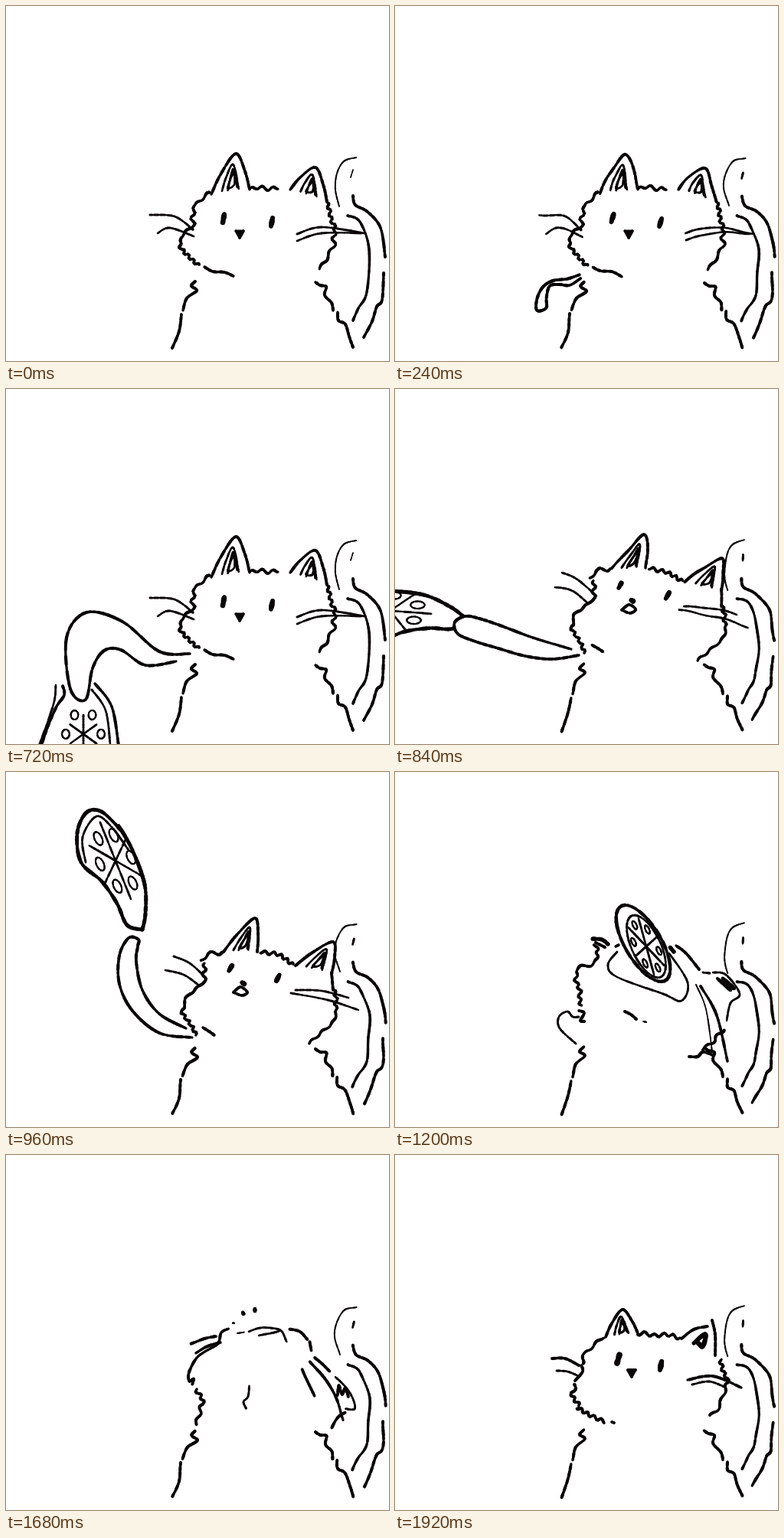
Write an HTML page with a canvas that moves like this. It is 500x464 px and loops after 1.98 s.

```html
<!DOCTYPE html>
<html lang="en">
<head>
<meta charset="utf-8">
<title>Hungry cat</title>
<style>
html, body { margin: 0; width: 100%; height: 100%; overflow: hidden; background: #fff; }
canvas { display: block; }
</style>
</head>
<body>
<canvas id="stage" width="500" height="464"></canvas>
<script>
const ctx = document.getElementById('stage').getContext('2d');
const INK = '#0a0506', STEP = 60, COUNT = 33;
let phase = 0; // which redrawing of the same line is shown

const spline = (a, b, c, d, t) =>
  b + t / 2 * (c - a + t * (2 * a - 5 * b + 4 * c - d + t * (3 * (b - c) + d - a)));

// Smooth curve through flat x, y pairs, with an optional furry ripple.
function curve(p, ripple = 0) {
  const n = p.length / 2, out = [], steps = ripple ? 14 : 8;
  const at = (k, axis) => p[Math.max(0, Math.min(n - 1, k)) * 2 + axis];
  for (let k = 0; k < (n - 1) * steps + 1; k++) {
    const j = Math.min(n - 2, Math.floor(k / steps)), t = k / steps - j;
    let [x, y] = [0, 1].map(a => spline(at(j - 1, a), at(j, a), at(j + 1, a), at(j + 2, a), t));
    if (ripple) {
      const r = ripple * (Math.sin(x * 0.47 + y * 0.52) + 0.6 * Math.sin(x * 0.21 - y * 0.27));
      const dx = at(j + 1, 0) - at(j, 0), dy = at(j + 1, 1) - at(j, 1), d = Math.hypot(dx, dy);
      x -= r * dy / d;
      y += r * dx / d;
    }
    if (phase) {
      x += Math.sin(y * 0.11 + phase * 4);
      y += Math.sin(x * 0.12 + phase * 3);
    }
    out.push([x, y]);
  }
  return out;
}

function ink(points, width) {
  points.forEach(([x, y], k) => {
    if (!k) return;
    ctx.lineWidth = width * (0.96 + 0.13 * Math.sin(x * 0.7 + y * 0.9));
    ctx.beginPath();
    ctx.moveTo(...points[k - 1]);
    ctx.lineTo(x, y);
    ctx.stroke();
  });
}

function fill(points, color) {
  ctx.fillStyle = color;
  ctx.beginPath();
  points.forEach(p => ctx.lineTo(...p));
  ctx.fill();
}

const pen = (width, ...p) => ink(curve(p), width);
const line = (...p) => pen(3.8, ...p);
const thin = (...p) => pen(2.8, ...p);
const fur = (...p) => ink(curve(p, 2.1), 3.8);

// Two bowed sides with a scribble between them.
function ear(ax, ay, tx, ty, bx, by) {
  const at = (u, v) => [
    (ax + (bx - ax) * u) * (1 - v) + tx * v,
    (ay + (by - ay) * u) * (1 - v) + ty * v
  ];
  line(ax, ay, ...at(-0.15, 0.5), tx, ty, ...at(1.12, 0.5), bx, by);
  thin(...at(0.26, 0.05), ...at(0.22, 0.4), ...at(0.4, 0.72), ...at(0.72, 0.06));
  thin(...at(0.42, 0.05), ...at(0.45, 0.6), ...at(0.6, 0.2), ...at(0.4, 0.12), ...at(0.55, 0.5), ...at(0.68, 0.1));
}

function nose(x, y) {
  const p = [[x - 5, y - 4], [x + 5, y - 4], [x, y + 5], [x - 5, y - 4]];
  fill(p, INK);
  ink(p, 3.5);
}

function body() {
  line(247, 360, 242, 366, 249, 372, 236, 382, 231, 398);
  line(229, 403, 226, 425, 217, 447);
  line(404, 361, 410, 365, 418, 367, 416, 378, 425, 388, 427, 398);
  line(433, 400, 434, 411, 443, 416, 448, 432, 453, 446);
}

function tail() {
  pen(2, 457, 198, 441, 203, 432, 219, 430, 240, 435, 262);
  phase ? thin(454, 217, 453, 225) : pen(1.5, 453, 214, 450, 224);
  line(453, 248, 456, 260, 472, 269, 489, 290, 495, 328);
  line(493, 349, 491, 384, 484, 393, 478, 412, 467, 433);
  pen(3.4, 446, 274, 462, 282, 474, 318, 471, 374, 460, 395, 453, 411);
}

function front() {
  fur(267, 246, 247, 258, 244, 292);
  ear(268, 246, 300, 193, 318, 240);
  fur(318, 239, 336, 238, 355, 238);
  ear(371, 240, 404, 211, 419, 256);
  fur(418, 258, 428, 288, 426, 318, 407, 342);
  fur(243, 291, 229, 305, 231, 320, 250, 340);
  line(259, 341, 270, 347, 285, 348, 297, 353);
  thin(188, 273, 220, 275, 244, 292);
  thin(198, 297, 214, 290, 245, 301);
  thin(380, 298, 412, 289, 468, 297);
  thin(380, 307, 412, 297, 468, 297);
  pen(6.5, 285, 272, 283, 283);
  pen(6.5, 348, 277, 346, 288);
  nose(305, 298);
}

function lookUp() {
  ear(284, 235, 325, 191, 328, 235);
  fur(255, 247, 266, 239, 282, 235);
  fur(333, 234, 355, 239, 374, 253);
  ear(378, 253, 427, 222, 425, 264);
  line(425, 262, 427, 285);
  fur(258, 250, 258, 276, 240, 293, 231, 312, 248, 344);
  line(257, 334, 265, 339, 272, 344);
  fur(428, 285, 431, 315, 415, 338, 397, 356);
  thin(219, 241, 240, 250, 262, 270);
  thin(208, 259, 232, 265, 252, 279);
  thin(372, 289, 420, 298, 460, 311);
  thin(378, 285, 412, 286, 447, 295);
  pen(6, 295, 253, 291, 260);
  pen(6, 357, 265, 353, 273);
  pen(6, 308, 275, 311, 277);
  pen(3.5, 297, 288, 306, 281, 315, 288, 308, 292, 297, 288);
}

function gape() {
  pen(5, 258, 218, 270, 219, 278, 225);
  line(262, 223, 274, 229);
  line(288, 228, 292, 226);
  fur(262, 226, 262, 246, 238, 260, 240, 285, 244, 305);
  line(240, 312, 247, 315, 242, 325, 247, 326);
  thin(240, 320, 232, 320, 225, 313, 214, 320, 215, 335, 236, 355);
  thin(290, 235, 278, 252, 290, 268, 350, 290, 374, 299, 382, 275, 358, 237);
  line(367, 227, 380, 237, 397, 258);
  pen(5, 359, 229, 364, 235);
  thin(402, 262, 411, 263);
  thin(415, 262, 432, 265, 450, 290, 438, 302, 433, 325);
  pen(4.5, 421, 270, 438, 285, 428, 270, 443, 283, 426, 275);
  pen(2, 393, 278, 406, 310, 414, 365);
  line(399, 280, 420, 318, 434, 378);
  fur(427, 336, 418, 352, 402, 364);
  line(384, 372, 395, 372, 402, 366, 415, 370);
  line(300, 313, 308, 317, 315, 323);
  pen(2, 324, 326, 328, 327);
}

function swallow() {
  pen(4.5, 308, 205, 309, 207);
  pen(4.5, 324, 202, 324, 205);
  pen(2.5, 296, 219, 298, 219);
  pen(2, 303, 232, 312, 231);
  thin(318, 231, 338, 226, 359, 228, 367, 244);
  thin(331, 237, 345, 233, 358, 229);
  line(371, 228, 385, 232, 394, 241);
  line(291, 227, 282, 233, 276, 248, 250, 262, 240, 282, 240, 295, 246, 292, 244, 299);
  line(242, 246, 258, 240, 275, 238);
  line(247, 258, 260, 251, 280, 246);
  fur(249, 305, 255, 325, 249, 351);
  thin(318, 302, 315, 316, 309, 322, 313, 331);
  line(397, 244, 398, 255);
  line(402, 264, 412, 272, 423, 283);
  thin(431, 291, 447, 308, 455, 330, 443, 332);
  line(432, 315, 435, 302, 438, 314, 443, 305, 446, 316);
  line(387, 281, 395, 297, 402, 314);
  line(396, 270, 420, 296, 441, 347);
  line(443, 337, 434, 344, 426, 357);
}

function settle() {
  ear(275, 238, 297, 202, 317, 233);
  fur(273, 240, 250, 256, 244, 272);
  fur(317, 234, 345, 235, 372, 238);
  line(374, 240, 390, 228, 408, 224);
  line(414, 216, 418, 235, 418, 262);
  pen(6, 390, 246, 405, 234, 402, 250, 396, 246);
  line(243, 275, 245, 283, 235, 295);
  fur(235, 300, 232, 312, 241, 328);
  fur(238, 331, 252, 340, 274, 347);
  line(283, 349, 286, 350);
  fur(424, 268, 433, 297, 424, 325, 412, 341);
  line(205, 266, 222, 266, 240, 275);
  thin(211, 282, 225, 283, 240, 289);
  line(382, 294, 415, 289, 452, 304);
  thin(388, 300, 410, 296, 430, 303);
  pen(7, 293, 261, 290, 272);
  pen(7, 348, 270, 346, 281);
  nose(309, 285);
}

// Point on a slanted oval given by its centre and two half axes.
const onOval = ([cx, cy, ux, uy, vx, vy], a, r = 1) => [
  cx + r * (ux * Math.cos(a) + vx * Math.sin(a)),
  cy + r * (uy * Math.cos(a) + vy * Math.sin(a))
];

function oval(shape, width) {
  const points = [];
  for (let k = 0; k <= 40; k++) points.push(onOval(shape, k * Math.PI / 20));
  ink(points, width);
}

// Six spokes with a small seed between each pair.
function spokes(shape, length, seed) {
  for (let k = 0; k < 6; k++) {
    const a = k * Math.PI / 3;
    thin(shape[0], shape[1], ...onOval(shape, a + Math.PI / 6, length));
    const [x, y] = onOval(shape, a, 0.72);
    oval([x, y, ...shape.slice(2).map(v => v * seed)], 2.2);
  }
}

function risen() {
  line(74, 388, 76, 400, 66, 415, 55, 440, 46, 466);
  thin(65, 387, 62, 412, 44, 464);
  line(116, 385, 138, 415, 147, 466);
  thin(112, 393, 130, 420, 136, 464);
  spokes([101, 451, 32, 0, 0, 40], 0.62, 0.15);
}

function flung() {
  pen(4.8, 178, 206, 158, 200, 145, 172, 125, 143, 98, 118, 93, 80, 105, 53, 125, 52, 151, 77);
  pen(4.8, 147, 70, 165, 102, 181, 147, 182, 185, 178, 206);
  thin(104, 118, 100, 85, 118, 58, 138, 72, 160, 102);
  spokes([143, 116, 28, -6, 20, 50], 1, 0.17);
}

function falling() {
  oval([324, 224, 32, 14, 15, 48], 4.4);
  const inner = [328, 228, 23, 8, 11, 40];
  oval(inner, 3);
  spokes(inner, 0.92, 0.13);
}

// Paw outlines: upper edge, tip, lower edge.
const reach = [238, 350, 190, 366, 135, 373, 95, 398, 72, 445, 72, 490, 108, 480, 109, 440, 122, 394, 160, 388, 200, 391, 243, 364];
const root = reach.map((_, k) => k % 2 ? 352 : 242);
const mix = (a, b, t) => a.map((v, k) => v + (b[k] - v) * t);
const lift = [240, 346, 200, 343, 152, 304, 105, 292, 79, 325, 84, 392, 104, 406, 113, 365, 128, 342, 150, 341, 182, 361, 222, 356];
const between = (i, from, to) => (i - from) / (to - from);
const swing = [230, 340, 180, 325, 140, 310, 110, 300, 92, 297, 78, 305, 82, 320, 105, 330, 135, 339, 170, 349, 205, 353, 240, 348];

function armAt(i) {
  const high = [235, 335, 200, 316, 178, 285, 170, 248, 172, 228, 173, 219, 160, 217, 148, 240, 148, 277, 165, 312, 200, 341, 243, 347];
  if (i < 3 || i > 18) return null;
  if (i < 8) return mix(root, reach, between(i, 2, 8));
  if (i < 10) return reach;
  if (i < 12) return mix(reach, lift, between(i, 9, 12));
  if (i < 14) return mix(lift, swing, between(i, 12, 14));
  if (i < 16) return mix(swing, high, between(i, 14, 16));
  return mix(high, root, (i - 16) * 0.38);
}

// Moves a pivot to a new place, turned and scaled.
function place(shape, px, py, x, y, turn = 0, scale = 1) {
  ctx.save();
  ctx.translate(x, y);
  ctx.rotate(turn * Math.PI / 180);
  ctx.scale(scale, scale);
  ctx.translate(-px, -py);
  shape();
  ctx.restore();
}

function drawDisc(i, arm) {
  if (i === 11 || i === 12) place(risen, 0, 0, 0, (12 - i) * 45);
  else if (i > 12 && i < 17) {
    const x = (arm[10] + arm[12]) / 2, y = (arm[11] + arm[13]) / 2;
    place(flung, 175, 206, x + 8.5, y - 12, -(16 - i) * (21 + (16 - i) * 5.5));
  } else if (i === 17) place(flung, 140, 130, 215, 132, 22, 0.95);
  else if (i > 17 && i < 21) {
    const left = 20 - i;
    place(falling, 325, 225, 325 - left * 20, 225 - left * 51, -left * 6);
  } else if (i > 20 && i < 23) {
    const sunk = i - 20;
    place(falling, 325, 225, 325 + sunk, 225 + sunk * 15, sunk * 4, 1 - sunk * 0.2);
  }
}

// Each head pose with the step it ends before and the step it is cleanest at.
const poses = [[front, 14, 0], [lookUp, 18, 16], [gape, 23, 20], [swallow, 29, 24], [settle, 33, 32]];

function render(i) {
  ctx.fillStyle = '#fff';
  ctx.fillRect(0, 0, 500, 464);
  ctx.strokeStyle = INK;
  ctx.lineCap = ctx.lineJoin = 'round';
  phase = i % 3;
  body();
  tail();
  const [head, , clean] = poses.find(p => i < p[1]);
  phase = (i - clean + COUNT) % 3;
  head();
  phase = 0;
  const arm = armAt(i);
  drawDisc(i, arm);
  if (arm) {
    const edge = curve(arm);
    fill(edge, '#fff');
    ink(edge, 3.9);
  }
}

const start = performance.now();
let last = -1;
function tick() {
  const i = Math.floor(Math.max(0, performance.now() - start) / STEP) % COUNT;
  if (i !== last) render(last = i);
  requestAnimationFrame(tick);
}
tick();
</script>
</body>
</html>
```
